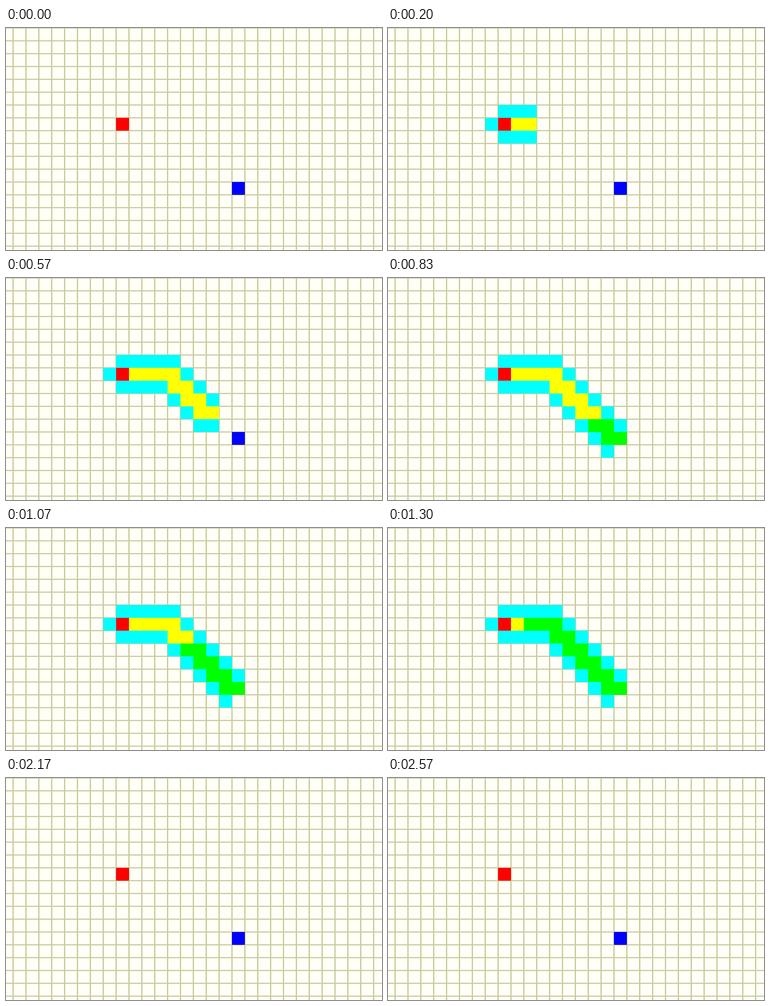
Write an HTML page with a canvas that moves like this. It is 584 by 346 pixels and loops after 2630 ms.

```html
<!DOCTYPE html>
<html lang="en">
<head>
<meta charset="utf-8">
<title>Grid path search</title>
<style>
  html, body { margin: 0; width: 100%; height: 100%; overflow: hidden; }
  canvas { display: block; }
</style>
</head>
<body>
<canvas id="stage" width="584" height="346"></canvas>
<script>
const ctx = document.getElementById('stage').getContext('2d');
const LOOP = 2630, CELL = 20, LEFT = 11;
const SEARCH_START = 38, SEARCH_STEP = 20;
const TRACE_START = 677, TRACE_STEP = 50, CLEAR_TIME = 1500;
const START = [8, 7], GOAL = [17, 12];
const UP = [0, -1], DOWN = [0, 1], BACK = [-1, 0], RIGHT = [1, 0];

// The route: four cells right, then a staircase down to the goal.
const path = [START];
for (const move of 'RRRRDRDRDRDRDR') {
  const [x, y] = path[path.length - 1];
  path.push(move === 'R' ? [x + 1, y] : [x, y + 1]);
}

// Each newly found neighbour takes one search step.
const opened = [], closed = [];
const seen = new Set([String(START), String(GOAL)]);
let clock = SEARCH_START;
for (const cell of path.slice(0, -1)) {
  closed.push({ cell, time: clock });
  for (const [dx, dy] of [UP, DOWN, BACK, RIGHT]) {
    const next = [cell[0] + dx, cell[1] + dy];
    if (seen.has(String(next))) continue;
    seen.add(String(next));
    opened.push({ cell: next, time: clock });
    clock += SEARCH_STEP;
  }
}
const traced = path.slice(1).reverse()
  .map((cell, i) => ({ cell, time: TRACE_START + i * TRACE_STEP }));

function fillCell([col, row], color) {
  ctx.fillStyle = color;
  ctx.fillRect(LEFT + col * CELL, row * CELL, CELL, CELL);
}

function fillReached(steps, time, color) {
  for (const step of steps) if (step.time <= time) fillCell(step.cell, color);
}

function drawGrid() {
  ctx.fillStyle = '#fffff8';
  ctx.fillRect(0, 0, 584, 346);
  ctx.fillStyle = '#d0d0a8';
  for (let y = 0; y < 346; y += CELL) ctx.fillRect(0, y - 1, 584, 2);
  ctx.fillStyle = '#cccc99';
  for (let x = LEFT; x < 584; x += CELL) ctx.fillRect(x - 1, 0, 2, 346);
}

function draw(time) {
  drawGrid();
  const searching = time < CLEAR_TIME;
  if (searching) {
    fillReached(opened, time, '#00ffff');
    fillReached(closed, time, '#ffff00');
  }
  fillCell(GOAL, '#0000ff');
  if (searching) fillReached(traced, time, '#00ff00');
  fillCell(START, '#ff0000');
}

function frame() {
  draw(performance.now() % LOOP);
  requestAnimationFrame(frame);
}
frame();
</script>
</body>
</html>
```
